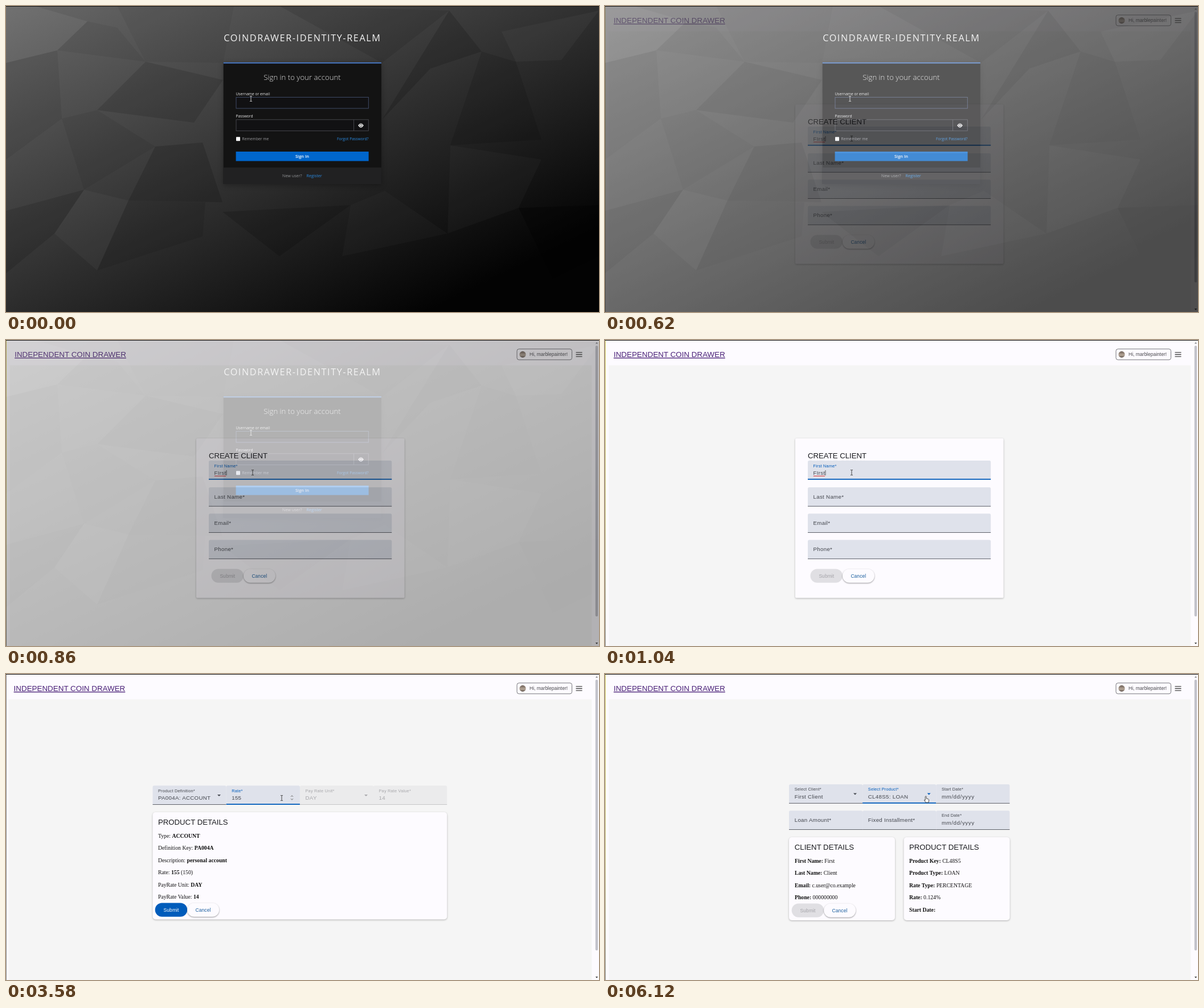
An HTML page that plays this animation: 1041 by 538 pixels, repeating every 8 s.

```html
<!DOCTYPE html>
<html lang="en">
<head>
<meta charset="utf-8">
<title>Banking demo</title>
<style>
html, body { margin: 0; width: 100%; height: 100%; overflow: hidden; background: #000; }
svg { display: block; width: 1041px; height: 538px; }
text { white-space: pre; }
.sans { font-family: "Liberation Sans", Arial, sans-serif; }
.serif { font-family: "Liberation Serif", Times, serif; }
.login { font-family: "Open Sans", sans-serif; }
.card { filter: drop-shadow(0 1.5px 1.5px rgba(0,0,0,.28)); }
.pill { filter: drop-shadow(0 1px .8px rgba(0,0,0,.4)); }
.panel { filter: drop-shadow(0 2px 5px rgba(0,0,0,.3)); }
</style>
</head>
<body>
<svg id="stage" viewBox="0 0 1041 538">
  <defs>
    <linearGradient id="dusk" gradientUnits="userSpaceOnUse" x1="0" y1="0" x2="353" y2="725">
      <stop stop-color="#696969"/><stop offset="1" stop-color="#030303"/>
    </linearGradient>
    <linearGradient id="fur" x2="0" y2="1">
      <stop stop-color="#6d5f55"/><stop offset=".6" stop-color="#b5a697"/><stop offset="1" stop-color="#5c5048"/>
    </linearGradient>
    <linearGradient id="edge" x2="0" y2="1">
      <stop stop-color="#c6bd4a"/><stop offset=".6" stop-color="#b4ad62"/><stop offset="1" stop-color="#77776f"/>
    </linearGradient>
  </defs>
</svg>
<script>
const BLUE = '#005cbb', INK = '#44474e', FIELD = '#dfe2eb', PAPER = '#fdfbff', LINK = '#2b8ae0';

const rect = (x, y, w, h, fill, extra = '') =>
  `<rect x="${x}" y="${y}" width="${w}" height="${h}" fill="${fill}" ${extra}/>`;
const path = (d, stroke, width = 1, fill = 'none') =>
  `<path d="${d}" stroke="${stroke}" stroke-width="${width}" fill="${fill}"/>`;
const text = (x, y, size, fill, str, extra = 'class="sans"') =>
  `<text x="${x}" y="${y}" font-size="${size}" fill="${fill}" ${extra}>${str}</text>`;
const bold = str => `<tspan font-weight="700">${str}</tspan>`;

const value = (x, y, str, fill = INK, gap = .3) =>
  text(x, y, 9.73, fill, str, `class="sans" letter-spacing="${gap}"`);
const label = (x, y, str, fill = INK) =>
  text(x, y, 7.3, fill, str, 'class="sans" letter-spacing=".23"');
const heading = (x, y, str) => text(x, y, 13.2, '#1a1b1f', str);
const lines = (x, rows) => rows.map(([y, str]) => text(x, y, 9.72, '#111', str, 'class="serif"')).join('');
const card = (x, y, w, h, r) => rect(x, y, w, h, PAPER, `rx="${r}" class="card"`);
const arrow = (x, y, fill = INK) => `<path d="M${x - 3} ${y - 1.5}h6l-3 3z" fill="${fill}"/>`;
const beam = (x, y, color) =>
  path(`M${x - 2} ${y - 4.5}h1.5l.5 .5l.5 -.5h1.5M${x} ${y - 4}v8M${x - 2} ${y + 4.5}h1.5l.5 -.5l.5 .5h1.5`, color, .9);

function field(x, y, w, state = '') {
  const h = 33.7, off = state === 'off', on = state === 'on';
  const line = on ? 1.8 : .9;
  return path(`M${x} ${y + h}v${2.5 - h}q0 -2.5 2.5 -2.5h${w - 5}q2.5 0 2.5 2.5v${h - 2.5}z`, 'none', 0, off ? '#ebebec' : FIELD)
    + rect(x, y + h - line, w, line, on ? BLUE : off ? '#c2c2c4' : '#50535b');
}

function buttons(x, y, enabled) {
  const caption = (cx, fill, str) =>
    text(cx, y + 15.2, 8.51, fill, str, 'class="sans" text-anchor="middle" letter-spacing=".06"');
  return rect(x, y, 56.5, 24.3, enabled ? BLUE : '#e0dfe3', 'rx="12.1"')
    + rect(x + 56.5, y, 56, 24.3, PAPER, 'rx="12.1" class="pill"')
    + caption(x + 28.3, enabled ? '#fff' : '#a4a3a8', 'Submit')
    + caption(x + 84.3, '#1b5f9f', 'Cancel');
}

// Header, page background and scrollbar shared by the app pages.
function page(shift, edge, content) {
  return rect(0, 0, 1041, 538, PAPER)
    + rect(6.5 - shift, 44.5, 1021.7 + shift, 494, '#f5f5f5')
    + rect(0, 0, 1, 538, edge)
    + text(15.2 - shift * .8, 30, 13.4, '#4a2078', 'INDEPENDENT COIN DRAWER', 'class="sans" text-decoration="underline"')
    + rect(897, 15.8, 96.5, 19, PAPER, 'rx="3.5" stroke="#77777c"')
    + '<circle cx="907" cy="25.4" r="5.6" fill="url(#fur)"/>'
    + text(919, 28.3, 8.51, '#48484c', 'Hi, marblepainter!')
    + path('M1000.5 21.9h11M1000.5 25.5h11M1000.5 29.1h11', '#444', 1.3)
    + rect(1034.7, 10, 4.4, 476, '#c2c2ca', 'rx="2"')
    + path('M1034.8 6.6h4.4l-2.2 -2.8z', 'none', 0, '#8b8b90')
    + path('M1034.8 532h4.4l-2.2 2.8z', 'none', 0, '#444')
    + content;
}

function loginPage() {
  // Facets: outline and shade (positive lightens, negative darkens).
  const facets = [
    ['0,0 50,0 143,27 90,78 0,100', .05],
    ['143,27 195,38 245,98 90,78', -.06],
    ['0,100 90,78 98,198 0,270', -.07],
    ['245,98 381,130 330,205 160,183', -.13],
    ['98,198 160,183 262,247 137,323', -.07],
    ['262,247 345,240 380,345 215,342', -.16],
    ['215,342 350,345 345,405 160,465', -.1],
    ['137,323 215,342 160,465 85,400', .03],
    ['0,360 137,323 85,400 0,470', -.13],
    ['195,0 400,0 381,100 245,98', -.05],
    ['480,0 778,8 660,100', -.1],
    ['778,8 835,80 745,110 660,200', -.16],
    ['835,80 895,98 940,235 780,245', -.13],
    ['870,45 1041,8 975,95 895,98', .03],
    ['780,245 940,270 900,355 775,400', .025],
    ['900,355 1041,350 1041,440 960,480', -.35],
    ['605,350 665,325 775,400 590,440', .02],
    ['380,362 605,350 480,440', -.16]
  ].map(([points, shade]) =>
    `<polygon points="${points}" fill="${shade > 0 ? '#fff' : '#000'}" opacity="${Math.abs(shade)}"/>`).join('');
  const font = 'class="login"', mid = font + ' text-anchor="middle"';
  const input = (y, color) => rect(404, y, 232.3, 19.6, '#111113', `stroke="${color}" stroke-width=".9"`);

  return rect(0, 0, 1041, 538, 'url(#dusk)') + facets
    + text(520.3, 62, 16.2, '#f4f4f4', 'COINDRAWER-IDENTITY-REALM', mid + ' letter-spacing="1.6"')
    + rect(381.7, 99, 277.2, 214, '#131313', 'class="panel"')
    + rect(381.7, 99, 277.2, 2.2, '#446fb4')
    + rect(381.7, 284, 277.2, 29, '#212122')
    + text(520, 130.2, 13.2, '#e4e4e4', 'Sign in to your account', mid + ' font-weight="300"')
    + text(403.5, 157, 6.7, '#e8e8e8', 'Username or email', font)
    + input(160.4, '#44506f')
    + text(403.5, 196.4, 6.7, '#e8e8e8', 'Password', font)
    + input(199.8, '#4a4b50')
    + path('M610.5 200v19.4', '#4a4b50', .9)
    + path('M618.2 210q4.8 -7.4 9.6 0q-4.8 7.4 -9.6 0z', 'none', 0, '#fff')
    + '<circle cx="623" cy="209.8" r="2.1" fill="#fff" stroke="#131313" stroke-width=".9"/>'
    + rect(404, 230.2, 7, 7, '#fff', 'rx=".8"')
    + text(414.6, 236, 6.75, '#9a9a9d', 'Remember me', font)
    + text(636.5, 236, 6.75, LINK, 'Forgot Password?', font + ' text-anchor="end"')
    + rect(403.6, 256, 233, 16.6, '#0066cc')
    + text(520, 266.7, 7.5, '#fff', 'Sign In', mid + ' font-weight="600"')
    + text(485, 300.6, 7.2, '#8f9194', 'New user?', font)
    + text(527.5, 300.6, 7.2, LINK, 'Register', font)
    + beam(430, 163, '#ddd');
}

function clientPage() {
  const rows = [[259, 'Last Name*'], [305.2, 'Email*'], [351.5, 'Phone*']];
  return page(0, 'url(#edge)',
    card(334, 173, 365.6, 280.5, 2)
    + heading(356, 207.7, 'CREATE CLIENT')
    + field(356, 212, 321.2, 'on')
    + label(365.5, 223.7, 'First Name*', BLUE)
    + value(365.5, 237.2, 'FIrst')
    + path('M366 240' + 'l1 -1.5l1 1.5'.repeat(10), '#d33', .8)
    + path('M387 229v9', '#333', .8)
    + beam(433, 233, '#333')
    + rows.map(([y, str]) => field(356, y, 321.2) + value(365.5, y + 19.6, str)).join('')
    + buttons(360.5, 402.5, false));
}

function productPage() {
  const dim = '#a8a8ab';
  const cells = [
    [257.5, 'Product Definition*', 'PA004A: ACCOUNT', ''],
    [386.7, 'Rate*', '155', 'on'],
    [516, 'Pay Rate Unit*', 'DAY', 'off'],
    [645, 'Pay Rate Value*', '14', 'off']
  ].map(([x, name, str, state]) => field(x, 196.2, 129.2, state)
    + label(x + 9.5, 207.6, name, state === 'on' ? BLUE : state ? dim : INK)
    + value(x + 9.5, 220.7, str, state === 'off' ? dim : INK)).join('');
  return page(2, '#88888c', cells
    + arrow(374, 213.5) + arrow(632, 213.5, dim)
    + path('M500 216l2 -2.4l2 2.4M500 219l2 2.4l2 -2.4', '#777', 1)
    + beam(484, 218, '#333')
    + card(257.5, 243, 516.7, 188.5, 5)
    + heading(267, 264.8, 'PRODUCT DETAILS')
    + lines(267, [
      [288.2, 'Type: ' + bold('ACCOUNT')],
      [309.4, 'Definition Key: ' + bold('PA004A')],
      [330.9, 'Description: ' + bold('personal account')],
      [352.3, 'Rate: ' + bold('155') + ' (150)'],
      [373.6, 'PayRate Unit: ' + bold('DAY')],
      [395, 'PayRate Value: ' + bold('14')]])
    + buttons(261.7, 402.5, true));
}

function loanPage() {
  const [a, b, c] = [323, 452.1, 581.2], w = 129.2, pad = 9.7;
  const row = (y, focus) => field(a, y, w) + field(b, y, w, focus) + field(c, y, w);
  const date = y => value(c + pad, y, 'mm/dd/yyyy', INK, .6);
  return page(0, 'url(#edge)',
    row(194, 'on') + row(240.2)
    + label(a + pad, 205.4, 'Select Client*') + value(a + pad, 218.6, 'First Client') + arrow(439, 211)
    + label(b + pad, 205.4, 'Select Product*', BLUE) + value(b + pad, 218.6, 'CL48S5: LOAN') + arrow(568.6, 211, BLUE)
    + label(c + pad, 205.4, 'Start Date*') + date(218.6)
    + value(a + pad, 260.2, 'Loan Amount*') + value(b + pad, 260.2, 'Fixed Installment*')
    + label(c + pad, 251.4, 'End Date*') + date(265)
    + rect(c + pad, 266.4, 62, 4, FIELD)
    + card(323, 287, 186, 146, 5) + card(524.6, 287, 186, 146, 5)
    + heading(332.8, 309, 'CLIENT DETAILS') + heading(534, 309, 'PRODUCT DETAILS')
    + lines(333, [
      [331.8, bold('First Name:') + ' First'],
      [353.2, bold('Last Name:') + ' Client'],
      [374.5, bold('Email:') + ' c.user@co.example'],
      [396, bold('Phone:') + ' 000000000']])
    + lines(534, [
      [331.8, bold('Product Key:') + ' CL48S5'],
      [353.2, bold('Product Type:') + ' LOAN'],
      [374.5, bold('Rate Type:') + ' PERCENTAGE'],
      [396, bold('Rate:') + ' 0.124%'],
      [417.5, bold('Start Date:')]])
    + buttons(327.7, 403.4, false)
    + path('M562.2 222v-6.5q1 -1.6 2 0v3.6l3.4 .8q1.2 .4 1 2l-.7 4.1h-4.6l-2.9 -4.2q.3 -1.2 1.8 .2z', '#222', .8, '#fff'));
}

const stage = document.getElementById('stage');
stage.innerHTML += [loginPage(), clientPage(), productPage(), loanPage()]
  .map(scene => `<g class="scene">${scene}</g>`).join('') + rect(0, 0, 1041, 1, '#111');

const scenes = [...stage.querySelectorAll('.scene')];
const LOOP = 8000, FADES = [500, 3040, 5580], STEP = 60, STEPS = 10;

function draw() {
  const t = performance.now() % LOOP;
  FADES.forEach((start, i) => {
    const step = Math.floor((t - start) / STEP) + 1;
    const alpha = Math.max(0, Math.min(STEPS, step)) / STEPS;
    scenes[i + 1].setAttribute('opacity', alpha);
  });
  requestAnimationFrame(draw);
}
draw();
</script>
</body>
</html>
```
